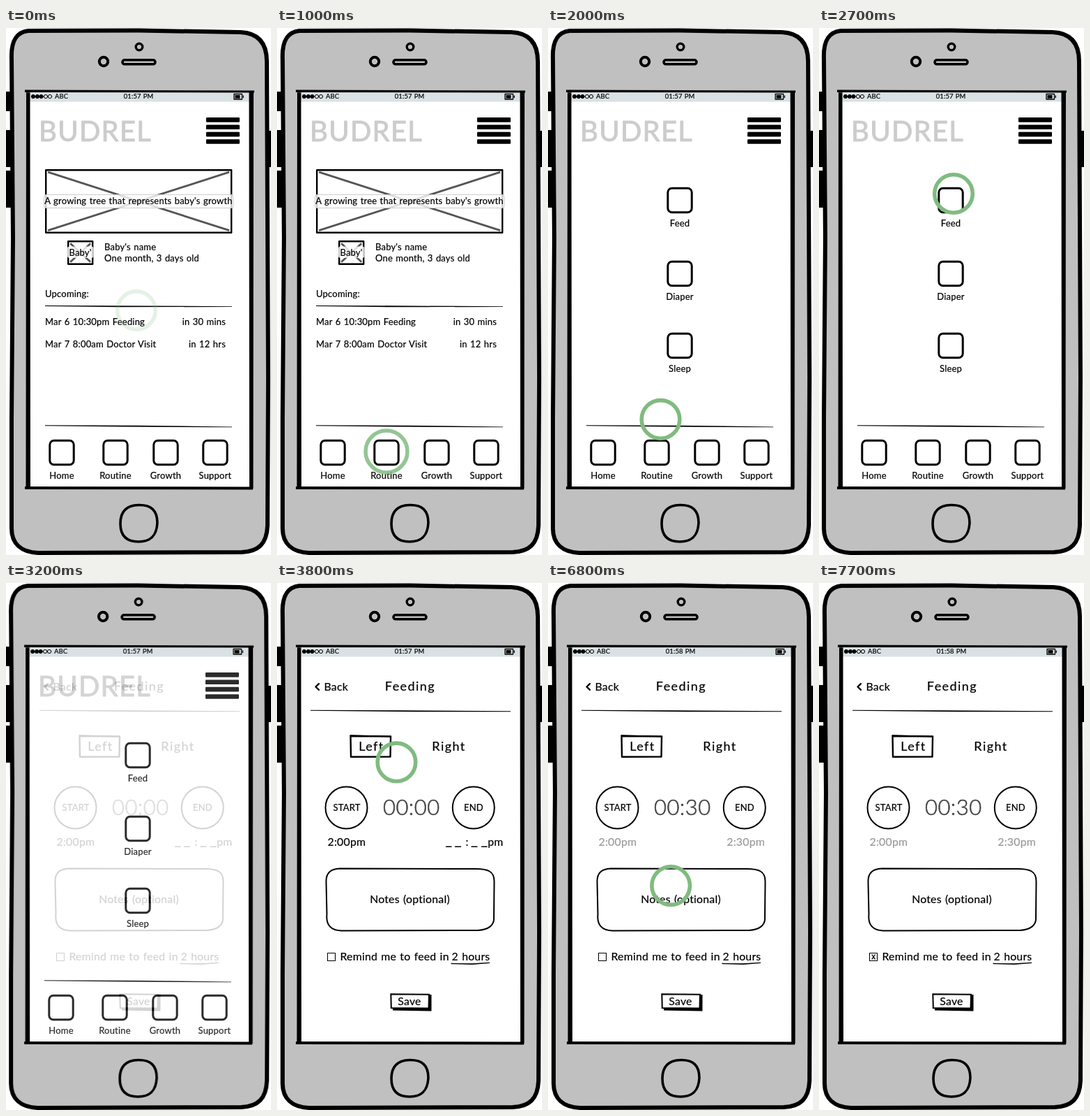
These frames come from a looping animation (380x754 px, 8000 ms). An HTML page:

```html
<!DOCTYPE html>
<html lang="en">
<head>
<meta charset="utf-8">
<title>Baby routine wireframe</title>
<style>
  html, body { margin: 0; width: 100%; height: 100%; overflow: hidden; background: #fff; }
  svg { display: block; width: 380px; height: 754px; }
  text {
    font-family: Lato, "Open Sans", sans-serif;
    font-size: 13px;
    letter-spacing: .015em;
    word-spacing: .06em;
    fill: #000;
    stroke: #000;
    stroke-width: .2;
  }
  .mid { text-anchor: middle; }
  .end { text-anchor: end; }
  .tiny { font-size: 9.4px; }
  .body { font-size: 15.8px; }
  .head { font-size: 18px; letter-spacing: .08em; }
  .dim { fill: #999; stroke: #999; }
  .logo { font-size: 40px; letter-spacing: 1.3px; fill: #ccc; stroke: #ccc; stroke-width: .9; stroke-linejoin: round; }
  .timer { font-size: 31px; font-weight: 300; fill: #444; stroke: #444; stroke-width: .6; }
  .line { fill: none; stroke: #000; stroke-linecap: round; stroke-linejoin: round; }
</style>
</head>
<body>
<svg id="stage" viewBox="0 0 380 754"></svg>
<script>
const text = (x, y, s, cls = '') => `<text x="${x}" y="${y}" class="${cls}">${s}</text>`;
const line = (d, w = 2) => `<path class="line" d="${d}" stroke-width="${w}"/>`;
const fill = (d, c = '#000') => `<path d="${d}" fill="${c}"/>`;
const group = (id, s) => `<g id="${id}">${s}</g>`;
const icon = (x, y, label) =>
  `<rect class="line" x="${x - 17.2}" y="${y - 17.2}" width="34.4" height="34.4" rx="6" stroke-width="3"/>` +
  text(x, y + 37, label, 'mid');

const phone = () => `
  <rect width="382" height="754" fill="#fff"/>
  ${fill('M0 91H9V119H0ZM0 146H9V199H0ZM0 204H9V257H0ZM374 147H382V199H374Z')}
  <path d="M32 4C15 6 7 18 8 44L10 300 8 560V716C8 738 22 750 46 751L338 750C362 749 374 738 375 712
    L376 500 374 48C374 20 360 7 336 6L190 3.5Z" fill="#c0c0c0" stroke="#000" stroke-width="6"/>
  <circle class="line" cx="191" cy="27" r="4.8" stroke-width="3.4"/>
  <circle class="line" cx="140" cy="48" r="6.2" stroke-width="4"/>
  <rect class="line" x="167" y="45.8" width="47" height="6" rx="3" stroke-width="3.6"/>
  ${line('M190 682.5C208 682 217 690 217 708C216 726 208 735 190 735C172 735 164 726 164 709C164 691 173 683 190 682.5Z', 3.6)}
  <rect x="31" y="90" width="321" height="568" fill="#fff"/>
  <rect x="34" y="92" width="315" height="13.5" fill="#d9e1e4"/>
  ${fill('M29 89H34.5L35 659H28.5ZM348.5 90H355L354.5 659H349ZM27 88.5L356 89.5V92.5L27 92ZM27 656L354 656.5V660.5L27 660Z')}
  ${[39, 45, 50.5, 57, 63].map((x, i) =>
    `<circle class="line" cx="${x}" cy="98" r="2.6" stroke-width="1" style="fill:${i < 3 ? '#000' : 'none'}"/>`).join('')}
  ${text(70, 101.3, 'ABC', 'tiny')}
  ${line('M327 94.5H338.5V102H327ZM340.3 97V99.5', 1.3)}${fill('M328.5 96H335.5V100.7H328.5Z')}`;

const clock = s => text(190, 101.3, s + ' PM', 'tiny mid');

const frame = () => phone() + clock('01:57') + text(47, 161.5, 'BUDREL', 'logo') +
  [131.4, 141.8, 152.1, 162.5].map(y =>
    `<rect x="287" y="${y - 3.3}" width="48" height="6.6" rx="1.2"/>`).join('') +
  fill('M56 568.2L190 568.8 324 570.4V571.2L170 570.6 56 569.2Z') +
  [[80, 'Home'], [157, 'Routine'], [229, 'Growth'], [300, 'Support']].map(([x, s]) => icon(x, 607.5, s)).join('');

const crossed = (x, y, w, h) =>
  `<path d="M${x + 3} ${y + 3}L${x + w - 3} ${y + h - 3}M${x + w - 3} ${y + 3}L${x + 3} ${y + h - 3}" stroke="#555" stroke-width="2.8"/>` +
  `<rect class="line" x="${x}" y="${y}" width="${w}" height="${h}" stroke-width="2.4"/>`;
const tag = (x, y, w, h, edge) =>
  `<rect x="${x}" y="${y}" width="${w}" height="${h}" rx="3" fill="#fff" fill-opacity=".8" stroke="${edge}"/>`;

const home = frame() +
  crossed(57.2, 203.2, 266, 89.5) + tag(54.5, 238.5, 271.5, 19, '#ccc') +
  text(190, 251.7, "A growing tree that represents baby's growth", 'mid') +
  crossed(89.2, 305.2, 35, 32.5) + tag(88, 312.5, 37.5, 16.5, 'none') +
  text(106.5, 325.5, "Baby'", 'mid') +
  text(141, 318, "Baby's name") + text(141, 334, 'One month, 3 days old') +
  text(56, 384.5, 'Upcoming:') +
  fill('M56 397L190 397.5 324 398.2V399L160 399.3 56 398Z') +
  text(56, 424.5, 'Mar 6 10:30pm Feeding') + text(315, 424.5, 'in 30 mins', 'end') +
  text(56, 456.5, 'Mar 7 8:00am Doctor Visit') + text(315, 456.5, 'in 12 hrs', 'end');

const routine = frame() +
  icon(190, 246.5, 'Feed') + icon(190, 351.5, 'Diaper') + icon(190, 454.5, 'Sleep');

const feeding = phone() +
  group('clockA', clock('01:57')) + group('clockB', clock('01:58')) +
  line('M60 144.2L55.5 148.5 60 152.8', 2.4) + text(67.5, 153.5, 'Back', 'body') +
  text(191, 154, 'Feeding', 'head mid') +
  fill('M48 181.8L180 182.2 335 183.2V184.2L200 184.3 48 182.8Z') +
  line('M105.5 219L163 219.5 162.5 248.5 106 248.8Z', 2.4) + line('M105 218L163.5 219.8', 1.5) +
  text(135.5, 239.8, 'Left', 'head mid') + text(246.5, 239.8, 'Right', 'head mid') +
  '<circle class="line" cx="99.5" cy="321.5" r="30" stroke-width="2"/>' +
  '<circle class="line" cx="281.8" cy="321.5" r="30" stroke-width="2"/>' +
  text(100, 326, 'START', 'mid') + text(282, 326, 'END', 'mid') +
  group('timerA', text(192.8, 332, '00:00', 'timer mid')) +
  group('timerB', text(192.8, 332, '00:30', 'timer mid')) +
  group('labelsA', text(72.5, 375.8, '2:00pm', 'body') + text(324.5, 375.8, 'pm', 'body end') +
    text(272.5, 375.8, ':', 'body mid') + line('M242.5 377.3H250M255.5 377.3H263.5M279 377.3H287M293.5 377.3H301', 1.4)) +
  group('labelsB', text(72.5, 375.8, '2:00pm', 'body dim') + text(311, 375.8, '2:30pm', 'body dim end')) +
  line('M90 408.5L285 409C302 409 312 412 311.5 428L311 478C312 490 303 496 288 497L92 497.5C77 497 70 489 71.5 474L70.5 428C70 415 77 409 90 408.5Z') +
  text(190.5, 458, 'Notes (optional)', 'body mid') +
  line('M72.5 529.5H83.5V540.5H72.5Z', 1.1) +
  group('check', line('M76 531.8L80.3 538.2M80.3 531.8L76 538.2', 1.2)) +
  text(90.5, 539.8, 'Remind me to feed in', 'body') + text(250.5, 539.8, '2 hours', 'body') +
  fill('M249 543.8L280 544.3 305 542.8V544L280 546 250 545.2Z') +
  fill('M165 590L221.5 589V612.5L166 611.5Z') +
  '<path d="M163.3 588.2L218 588.8 217.5 608.5 163.8 608Z" fill="#fff" stroke="#000" stroke-width="2"/>' +
  text(190, 604, 'Save', 'body mid');

const stage = document.getElementById('stage');
stage.innerHTML = group('home', home) +
  `<g id="routine"><g transform="translate(-1)">${routine}</g></g>` +
  group('feeding', feeding) +
  '<circle id="ring" fill="none" stroke="#80bb80" stroke-width="5.6"/>';

const LOOP = 8000, STEP = 100, TAP = 320, LEAD = 20, FADE = 100;
const part = id => document.getElementById(id);
const ring = part('ring');
const ramp = (t, a, b) => Math.min(1, Math.max(0, (t - a) / (b - a)));

// id, fade start, fade end, rising (1) or falling (0)
const fades = [
  ['routine', 1200, 1800, 1],
  ['feeding', 3100, 3700, 1],
  ['timerA', 4500, 4800, 0], ['timerB', 4500, 4800, 1],
  ['labelsA', 5500, 5800, 0], ['labelsB', 5500, 5800, 1],
  ['clockA', 5500, 5800, 0], ['clockB', 5500, 5800, 1],
  ['check', 7300, 7700, 1]
].map(([id, ...rest]) => [part(id), ...rest]);

// start, arrival, tap, from x y, to x y
const moves = [
  [0, 800, 950, 187, 404, 157, 606],
  [1900, 2700, 2850, 157, 606, 193, 237],
  [3650, 4300, 4300, 193, 237, 99.5, 321],
  [5000, 5660, 5690, 99.5, 321, 283, 321],
  [6400, 7160, 7260, 283, 321, 80, 534]
];

function draw(t) {
  for (const [el, a, b, up] of fades) {
    const k = ramp(t, a, b);
    el.setAttribute('opacity', up ? k : 1 - k);
  }
  const m = moves.find(([a, , tap]) => t >= a - LEAD && t < tap + TAP);
  if (!m) return ring.setAttribute('opacity', 0);
  const [a, b, tap, x0, y0, x1, y1] = m;
  const k = ramp(t, a, b), burst = ramp(t, tap, tap + TAP);
  ring.setAttribute('cx', x0 + (x1 - x0) * k);
  ring.setAttribute('cy', y0 + (y1 - y0) * k);
  ring.setAttribute('r', 27.3 + 17 * burst);
  ring.setAttribute('opacity', ramp(t, a - LEAD, a - LEAD + FADE) * (1 - burst));
}

const began = performance.now();
function tick() {
  const t = (performance.now() - began) % LOOP;
  draw(Math.floor(t / STEP) * STEP);
  requestAnimationFrame(tick);
}
tick();
</script>
</body>
</html>
```
